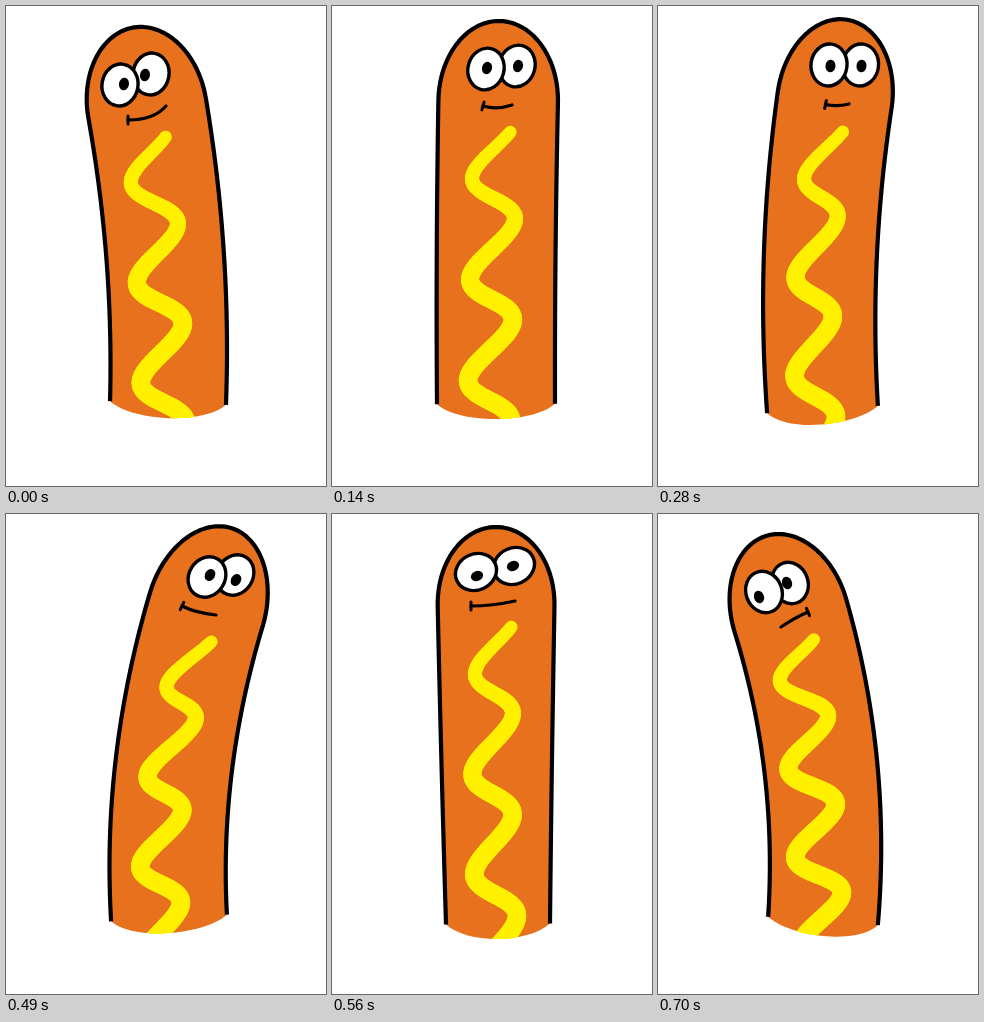
Animation, 320 px wide and 480 px high, one loop 0.77 s. Source, as an HTML page with a canvas:

```html
<!DOCTYPE html>
<html lang="en">
<head>
<meta charset="utf-8">
<title>Wiggling sausage</title>
<style>
  html, body { margin: 0; width: 100%; height: 100%; overflow: hidden; background: #fff; }
  canvas { display: block; }
</style>
</head>
<body>
<canvas id="stage" width="320" height="480"></canvas>
<script>
const ctx = document.getElementById('stage').getContext('2d');
const ORANGE = '#e8711d', MUSTARD = '#fff000', LID = '#944a14';
const LOOP = 770;

// spine, sauce and mouth are quadratic curves: start, control, end.
// girth is the half width at foot and head; swing is how far the mustard sways.
const leanLeft = {
  spine: [[162, 397], [168, 210], [125, 22]], girth: [58, 60],
  sauce: [[143, 122], [155, 272], [158, 422]], swing: 22,
  eyes: [[114, 79], [145, 68]], pupils: [[118, 78], [139, 69]], tilt: 10,
  mouth: [[122, 114], [148, 114], [160, 100]], tickAt: 0, closed: 0
};
const upright = {
  spine: [[164, 398], [163, 208], [168, 15]], girth: [59, 60],
  sauce: [[163, 117], [160, 268], [157, 420]], swing: 22,
  eyes: [[154, 63], [185, 60]], pupils: [[155, 62], [186, 60]], tilt: 15,
  mouth: [[151, 100], [165, 104], [180, 99]], tickAt: 0, closed: 0
};
const asleep = {
  spine: [[165, 409], [140, 210], [213, 13]], girth: [52, 56],
  sauce: [[183, 117], [136, 263], [160, 410]], swing: 17,
  eyes: [[188, 55], [220, 58]], pupils: [[190, 58], [221, 60]], tilt: 0,
  mouth: [[184, 97], [193, 98], [202, 97]], tickAt: 0, closed: 1
};
const leanRight = {
  spine: [[163, 404], [152, 210], [228, 15]], girth: [58, 59],
  sauce: [[195, 120], [148, 256], [155, 393]], swing: 20,
  eyes: [[201, 63], [229, 61]], pupils: [[204, 61], [230, 66]], tilt: 32,
  mouth: [[176, 92], [190, 99], [210, 101]], tickAt: 0, closed: 0
};
const puzzled = {
  spine: [[166, 410], [164, 210], [164, 13]], girth: [52, 60],
  sauce: [[166, 104], [155, 255], [165, 406]], swing: 20,
  eyes: [[144, 58], [182, 52]], pupils: [[145, 62], [181, 52]], tilt: 66,
  mouth: [[139, 92], [160, 92], [183, 87]], tickAt: 0, closed: 0
};
const tilted = {
  spine: [[165, 407], [180, 210], [105, 23]], girth: [55, 59],
  sauce: [[139, 118], [154, 250], [162, 383]], swing: 22,
  eyes: [[106, 78], [132, 69]], pupils: [[101, 83], [129, 69]], tilt: -20,
  mouth: [[123, 113], [138, 103], [150, 98]], tickAt: 1, closed: 0
};

function midway(a, b) {
  if (typeof a === 'number') return (a + b) / 2;
  if (Array.isArray(a)) return a.map((v, i) => midway(v, b[i]));
  return Object.fromEntries(Object.keys(a).map(k => [k, midway(a[k], b[k])]));
}

const steps = [
  [0, leanLeft],
  [70, midway(leanLeft, upright)],
  [140, upright],
  [280, midway(upright, asleep)],
  [350, asleep],
  [490, leanRight],
  [560, puzzled],
  [630, midway(puzzled, tilted)],
  [700, tilted]
];

const curve = ([a, b, c], t) => [0, 1].map(k =>
  (1 - t) ** 2 * a[k] + 2 * t * (1 - t) * b[k] + t * t * c[k]);

// Unit vector along the curve.
function heading([a, b, c], t) {
  const [x, y] = [0, 1].map(k => (1 - t) * (b[k] - a[k]) + t * (c[k] - b[k]));
  const size = Math.hypot(x, y);
  return [x / size, y / size];
}

// One flank of the body, from foot to crown; side is -1 for left, 1 for right.
function flank({ spine, girth: [foot, head] }, side) {
  const length = spine[0][1] - spine[2][1], cap = 80, count = 60;
  return Array.from({ length: count + 1 }, (_, i) => {
    const rest = (1 - i / count) ** 2, t = 1 - rest;
    const [x, y] = curve(spine, t), [dx, dy] = heading(spine, t);
    const round = Math.sqrt(1 - Math.max(0, 1 - rest * length / cap) ** 2);
    const reach = side * round * (foot + (head - foot) * t);
    return [x - dy * reach, y + dx * reach];
  });
}

function line(pts, width, color = '#000') {
  ctx.beginPath();
  pts.forEach(p => ctx.lineTo(...p));
  ctx.lineWidth = width;
  ctx.strokeStyle = color;
  ctx.stroke();
}

function arc(pts, width) {
  const [a, b, c] = pts;
  ctx.beginPath();
  ctx.moveTo(...a);
  ctx.quadraticCurveTo(...b, ...c);
  ctx.lineWidth = width;
  ctx.strokeStyle = '#000';
  ctx.stroke();
}

function oval([x, y], rx, ry, tilt, fill, width) {
  ctx.beginPath();
  ctx.ellipse(x, y, rx, ry, tilt * Math.PI / 180, 0, 2 * Math.PI);
  ctx.fillStyle = fill;
  ctx.fill();
  if (!width) return;
  ctx.lineWidth = width;
  ctx.strokeStyle = '#000';
  ctx.stroke();
}

// The mustard sways around its centre curve and widens downwards.
function drawSauce({ sauce, swing }) {
  const rise = 5, first = 0.25, last = 7.2;
  let previous;
  for (let n = first; n < last; n += 0.05) {
    const [x, y] = curve(sauce, n / 6), sway = Math.cos(n * Math.PI);
    const point = [x + swing * sway, y - rise * sway];
    if (previous) line([previous, point], Math.min(18.5, 12 + 2 * n), MUSTARD);
    previous = point;
  }
}

function drawBody(pose) {
  const skin = [...flank(pose, -1), ...flank(pose, 1).reverse()];
  const [left, right] = [skin[0], skin[skin.length - 1]];
  const sag = 20, inset = 22;
  ctx.save();
  ctx.beginPath();
  skin.forEach(p => ctx.lineTo(...p));
  ctx.bezierCurveTo(right[0] - inset, right[1] + sag, left[0] + inset, left[1] + sag, ...left);
  ctx.fillStyle = ORANGE;
  ctx.fill();
  ctx.clip();
  drawSauce(pose);
  ctx.restore();
  ctx.lineCap = 'butt';
  line(skin, 4.2);
  ctx.lineCap = 'round';
}

function drawMouth({ mouth, tickAt }) {
  const end = Math.round(tickAt), half = 4;
  const [x, y] = curve(mouth, end), [dx, dy] = heading(mouth, end);
  arc(mouth, 3.2);
  line([[x + dy * half, y - dx * half], [x - dy * half, y + dx * half]], 3);
}

function drawFace(pose) {
  const { eyes, pupils, tilt } = pose, asleepNow = pose.closed === 1;
  for (const i of [1, 0]) {
    oval(eyes[i], 18, 21, tilt, asleepNow ? LID : '#fff', 3.4);
    if (!asleepNow) oval(pupils[i], 5, 6.3, tilt, '#000');
  }
  if (!asleepNow) return drawMouth(pose);
  for (const [x, y] of eyes) arc([[x - 19, y + 10], [x, y + 2], [x + 18, y + 12]], 3);
  oval(pose.mouth[1], 9, 5.5, 0, '#f00', 3.8);
}

function render(time) {
  const pose = steps.filter(([start]) => start <= time).pop()[1];
  ctx.clearRect(0, 0, 320, 480);
  drawBody(pose);
  drawFace(pose);
}

ctx.lineCap = ctx.lineJoin = 'round';
const begin = performance.now();
function play() {
  render((performance.now() - begin) % LOOP);
  requestAnimationFrame(play);
}
play();
</script>
</body>
</html>
```
